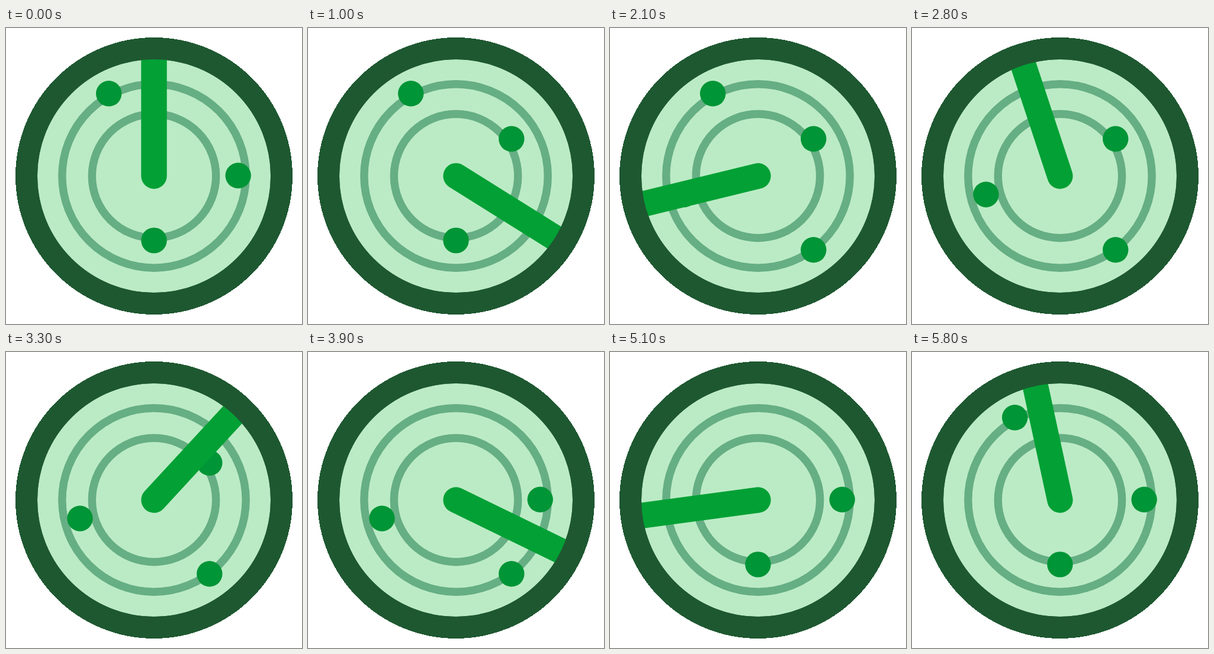
Animation of 500x500 px, one loop 5.9 s. Source, as an HTML page:

```html
<!DOCTYPE html>
<html lang="en">
<head>
<meta charset="utf-8">
<title>Radar</title>
<style>
  html, body { margin: 0; width: 100%; height: 100%; overflow: hidden; background: #fff; }
  svg { display: block; width: 100%; height: 100%; }
</style>
</head>
<body>
<svg viewBox="0 0 500 500">
  <circle cx="250" cy="250" r="234" fill="#1e5831" shape-rendering="crispEdges"/>
  <circle cx="250" cy="250" r="197" fill="#bbebc5"/>
  <g fill="none" stroke="#66ae84" stroke-width="13.4">
    <circle cx="250" cy="250" r="155.2"/>
    <circle cx="250" cy="250" r="104.7"/>
  </g>
  <g id="blips" fill="#009536"/>
  <path id="beam" d="M250 250V45" stroke="#02a035" stroke-width="43.4" stroke-linecap="round"/>
  <!-- rim hides the outer end of the beam -->
  <circle cx="250" cy="250" r="212" fill="none" stroke="#1e5831" stroke-width="30"/>
</svg>
<script>
const LOOP = 5900, STEP = 100, TURNS = 2, CENTER = 250;
const beam = document.getElementById('beam');
const layer = document.getElementById('blips');

// Each blip toggles when the beam passes; firstTurn: it lights up on the first of the two turns.
const blips = [
  { x: 173.7, y: 110.8, firstTurn: false },
  { x: 392.2, y: 249.3, firstTurn: false },
  { x: 250, y: 358.9, firstTurn: false },
  { x: 343.8, y: 187.3, firstTurn: true },
  { x: 343.8, y: 374.8, firstTurn: true },
  { x: 125, y: 281.2, firstTurn: true }
].map(blip => {
  const node = document.createElementNS('http://www.w3.org/2000/svg', 'circle');
  node.setAttribute('cx', blip.x);
  node.setAttribute('cy', blip.y);
  node.setAttribute('r', 21.7);
  layer.appendChild(node);
  const bearing = Math.atan2(blip.x - CENTER, CENTER - blip.y) * 180 / Math.PI;
  return { node, bearing: (bearing + 360) % 360, firstTurn: blip.firstTurn };
});

function render(ms) {
  const time = Math.floor(ms % LOOP / STEP) * STEP;
  const angle = time / LOOP * 360 * TURNS;
  beam.setAttribute('transform', `rotate(${angle} ${CENTER} ${CENTER})`);
  for (const { node, bearing, firstTurn } of blips) {
    const between = angle >= bearing && angle < bearing + 360;
    node.setAttribute('visibility', between === firstTurn ? 'visible' : 'hidden');
  }
}

const start = performance.now();
function tick() {
  render(performance.now() - start);
  requestAnimationFrame(tick);
}
tick();
</script>
</body>
</html>
```
